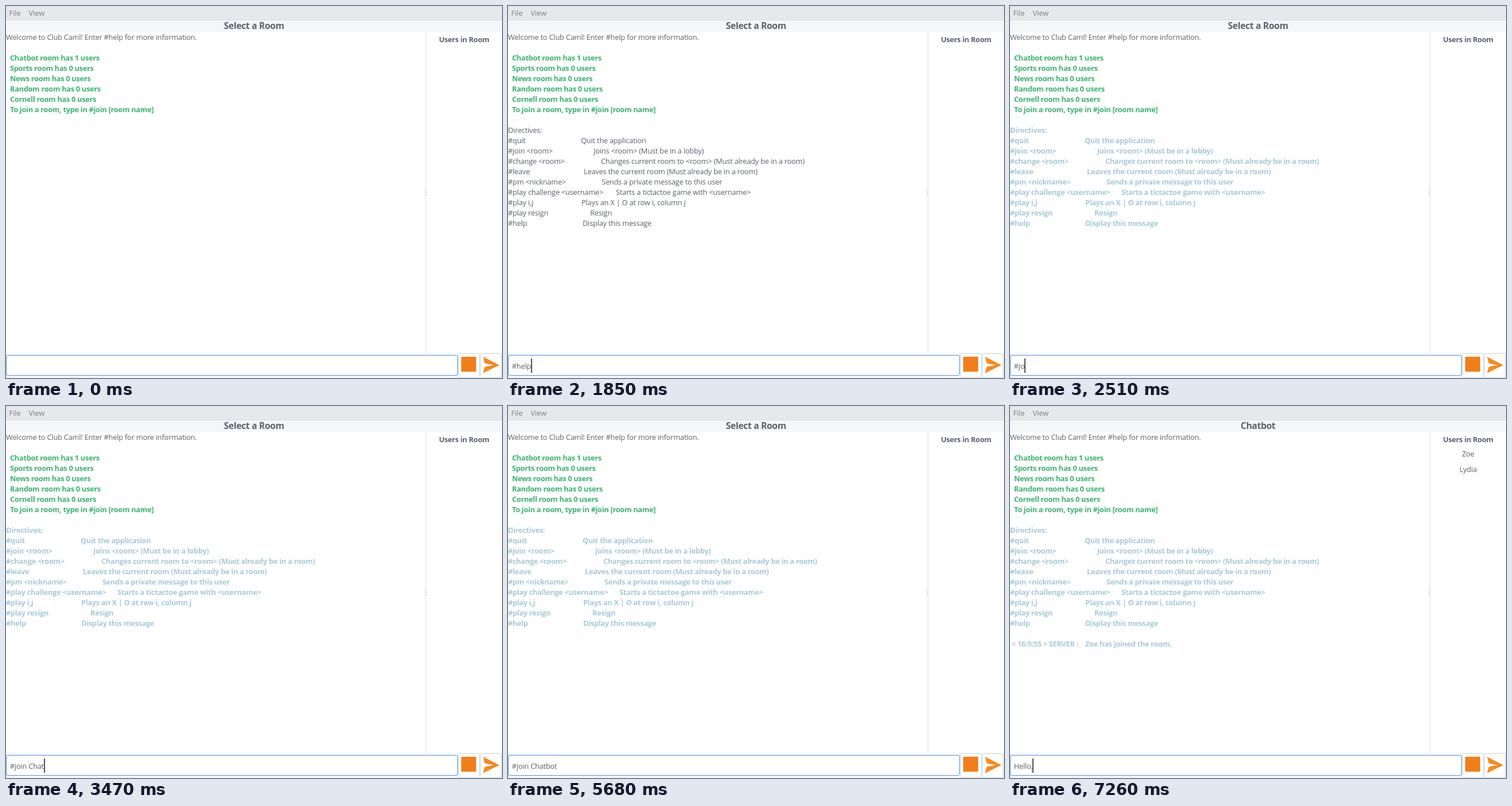
Recreate the animation shown at these times as an HTML page. Size 864 by 648 pixels, loop 8 s.

```html
<!DOCTYPE html>
<html lang="en">
<head>
<meta charset="utf-8">
<title>Chat client</title>
<style>
  html, body { margin: 0; width: 100%; height: 100%; overflow: hidden; }
  body {
    position: relative; background: #f5f6f7; color: #5c616c;
    font: 12.8px/18px "Open Sans", "Noto Sans", sans-serif;
    letter-spacing: -.21px; white-space: pre;
  }
  body *, .row::before { box-sizing: border-box; }
  .menu, .title, .log, .users, .entry, .btn, .grip, .row, .row span { position: absolute; }
  b, .title, .green, .pale { font-weight: 700; letter-spacing: -.3px; }

  .menu {
    left: 0; top: 0; width: 864px; height: 25px; line-height: 25px;
    background: #e7e8eb; border-bottom: 1px solid #d9dce2;
    color: #7a7f8a; letter-spacing: 0;
  }
  .menu span { position: absolute; }
  .title {
    left: 0; top: 25px; width: 864px; text-align: center;
    font-size: 15.7px; line-height: 19px; letter-spacing: -.37px;
  }
  .log { left: 0; top: 45px; width: 729px; height: 559px; background: #fff; }
  .row { left: 0; top: calc(var(--line) * 18px); }
  .row span { left: var(--x); top: 0; }
  .green { color: #3cb371; left: 7px; }
  .pale { color: #a9cad6; }
  .pale span { left: var(--bx); }

  .grip {
    left: 730px; top: 320px; width: 2px; height: 10px;
    background: repeating-linear-gradient(#d3d7df 0 2px, transparent 2px 4px);
  }
  .users {
    left: 734px; top: 45px; width: 130px; height: 559px;
    background: #fff; text-align: center;
  }
  .users > * { display: block; height: 27px; line-height: 26px; padding-right: 2px; }
  .users b { height: 25px; border-right: 1px solid #eff0f2; padding-right: 1px; }

  .entry {
    left: 0; top: 608px; width: 787px; height: 36px; padding: 1px 0 0 5.8px;
    display: flex; align-items: center;
    background: #fff; border: 1px solid #5294e2; border-radius: 3px;
  }
  .caret { width: 2px; height: 25px; margin-left: -.4px; background: #4b5059; }
  .btn {
    top: 605px; width: 37px; height: 43px;
    background: #fff; border: 1px solid #cfd6e6; border-radius: 3px;
  }
  .btn svg { position: absolute; left: 4px; top: 5px; }
</style>
</head>
<body>
<div class="menu"><span style="left:5.5px">File</span><span style="left:39.5px">View</span></div>
<div class="title" id="title">Select a Room</div>
<div class="log" id="log"></div>
<div class="grip"></div>
<div class="users"><b>Users in Room</b><div id="names"><div style="height:27px">Zoe</div><div style="height:27px">Lydia</div></div></div>
<div class="entry"><span id="text"></span><i class="caret" id="caret"></i></div>
<div class="btn" style="left:788px"><svg width="27" height="27"><rect width="26" height="26" fill="#f07f1b"/></svg></div>
<div class="btn" style="left:826px"><svg width="29" height="29"><path d="M0 0 28.5 14.5 0 28.5 3 17.5 18 14.5 3 11.5Z" fill="#f68a1e"/></svg></div>

<script>
const LOOP = 8000;
const HELP_AT = 1850, HELP_STYLED = 1900, JOIN_AT = 5970, JOIN_STYLED = 6020;
const $ = id => document.getElementById(id);

// x and bx: left edge of the second column in regular and bold type
function addRow(line, head, style = '', tail = '', x = 0, bx = x) {
  const row = document.createElement('div');
  row.className = 'row ' + style;
  row.textContent = head;
  row.style.cssText = `--line:${line};--x:${x}px;--bx:${bx}px`;
  if (tail) {
    const span = document.createElement('span');
    span.textContent = tail;
    row.append(span);
  }
  $('log').append(row);
  return row;
}

addRow(0, 'Welcome to Club Caml! Enter #help for more information.');
['Chatbot room has 1 users', 'Sports room has 0 users', 'News room has 0 users',
 'Random room has 0 users', 'Cornell room has 0 users',
 'To join a room, type in #join [room name]'
].forEach((s, i) => addRow(i + 2, s, 'green'));

const help = [
  ['Directives:'],
  ['#quit', 'Quit the application', 127, 130],
  ['#join <room>', 'Joins <room> (Must be in a lobby)', 149, 152],
  ['#change <room>', 'Changes current room to <room> (Must already be in a room)', 162, 166],
  ['#leave', 'Leaves the current room (Must already be in a room)', 132, 134],
  ['#pm <nickname>', 'Sends a private message to this user', 163, 168],
  ['#play challenge <username>', 'Starts a tictactoe game with <username>', 188, 194],
  ['#play i,j', 'Plays an X | O at row i, column j', 128, 131],
  ['#play resign', 'Resign', 143, 147],
  ['#help', 'Display this message', 130, 131]
].map(([head, ...rest], i) => addRow(i + 9, head, '', ...rest));

const joined = addRow(20, '< 16:9:55 > SERVER :', '', 'Zoe has joined the room.', 125, 128);
joined.style.left = '3px';

const typing = [
  [0, ''], [570, '#'], [800, '#j'], [1080, '#'],
  [1240, '#h'], [1320, '#he'], [1410, '#hel'], [1490, '#help'], [HELP_STYLED, ''],
  [2180, '#'], [2400, '#j'], [2510, '#jo'], [2570, '#joi'], [2660, '#join'],
  [2820, '#join '], [2980, '#join C'], [3240, '#join Ch'], [3390, '#join Cha'],
  [3470, '#join Chat'], [4330, '#join Chatb'], [4400, '#join Chatbo'],
  [4470, '#join Chatbot'], [JOIN_STYLED, ''],
  [6540, 'H'], [6730, 'He'], [6800, 'Hel'], [6960, 'Hell'], [7070, 'Hello'], [7260, 'Hello,']
];

const show = (el, on) => { el.style.visibility = on ? 'visible' : 'hidden'; };

function reveal(row, t, from, styled) {
  show(row, t >= from);
  row.classList.toggle('pale', t >= styled);
}

function draw(t) {
  $('text').textContent = typing.findLast(([at]) => t >= at)[1];
  show($('caret'), t >= 40 && !(t >= 5680 && t < JOIN_STYLED));
  help.forEach(row => reveal(row, t, HELP_AT, HELP_STYLED));
  reveal(joined, t, JOIN_AT, JOIN_STYLED);
  show($('names'), t >= JOIN_AT);
  $('title').textContent = t >= JOIN_AT ? 'Chatbot' : 'Select a Room';
}

const start = performance.now();
function tick() {
  draw((performance.now() - start) % LOOP);
  requestAnimationFrame(tick);
}
tick();
</script>
</body>
</html>
```
